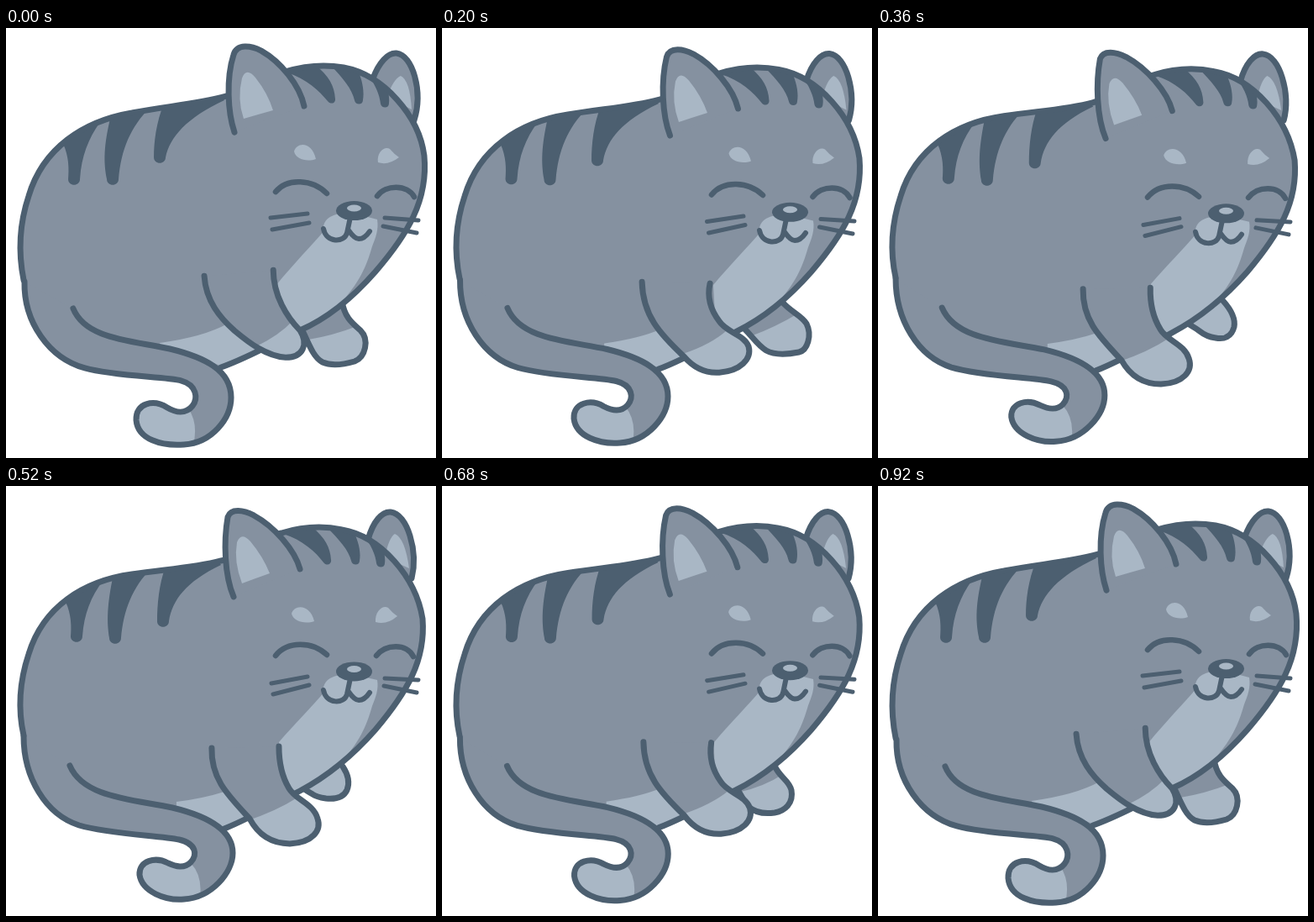
Animation, 512 px wide and 512 px high, one loop 0.96 s. Source, as an HTML page with a canvas:

```html
<!DOCTYPE html>
<html lang="en">
<head>
<meta charset="utf-8">
<title>Kneading cat</title>
<style>
  html, body { margin: 0; width: 100%; height: 100%; overflow: hidden; background: #fff; }
  canvas { display: block; width: 512px; height: 512px; }
</style>
</head>
<body>
<canvas id="stage" width="512" height="512"></canvas>
<script>
const ctx = document.getElementById('stage').getContext('2d');
const LOOP = 960, STEP = 40;
const DARK = '#4c5f70', FUR = '#8591a0', LIGHT = '#a9b7c5';

// Each part lists its raised pose, then its lowered pose.
const parts = {
  body: [
    'M256 404 C290 392 320 374 350 360 C380 347 412 322 440 290 C478 246 503 205 498 152 C492 105 450 56 402 47 C375 42 352 46 332 52 C310 58 285 76 262 81 C225 91 190 93 150 101 C92 111 44 143 27 200 C15 236 15 270 21 300',
    'M260 408 C290 396 325 376 350 363 C380 347 412 322 440 290 C477 246 500 208 496 158 C488 108 446 60 400 52 C372 46 348 50 328 56 C306 62 282 84 256 89 C222 98 190 99 150 105 C92 113 44 144 27 200 C15 236 15 270 21 297'],
  tail: [
    'M22 302 C21 350 51 393 94 405 C130 415 190 415 209 420 C227 425 229 441 222 450 C214 460 202 458 192 452 C176 442 154 446 155 467 C157 490 185 498 212 496 C245 494 268 465 268 440 C268 407 236 392 195 382 C150 372 95 371 80 334',
    'M21 298 C21 347 47 391 87 404 C125 415 185 416 206 421 C227 426 228 439 220 448 C212 456 202 453 193 449 C178 441 158 446 159 463 C162 483 190 494 212 492 C245 490 270 460 270 437 C270 410 240 393 198 383 C150 373 92 371 76 333'],
  tailTip: [
    'M217 453 Q230 472 222 500 L140 510 L140 435 L185 435 L205 458 Z',
    'M220 449 Q236 466 230 496 L140 506 L140 432 L187 432 L206 453 Z'],
  belly: [
    'M183 375 Q235 368 264 352 L300 384 L258 403 Q225 390 183 380 Z',
    'M203 376 Q235 372 260 364 L294 396 L262 408 Q235 394 203 382 Z'],
  chest: [
    'M378 236 C381 222 398 220 412 220 L442 228 C444 240 440 250 436 260 C429 285 420 304 398 328 L350 362 L325 340 L321 307 C343 280 365 258 380 240 Z',
    'M378 240 C381 226 398 224 412 224 L442 231 C444 242 440 252 436 262 C429 287 420 306 398 330 L344 368 L325 340 L325 305 C343 284 365 262 380 244 Z'],
  backStripes: [
    'M68 138 C75 153 75 168 74 180 C74 189 88 189 88 180 C90 152 98 132 112 112 L88 114 Z M125 104 C116 140 116 160 120 180 C120 189 134 189 134 180 C137 145 148 118 172 94 Z M188 90 C179 112 176 135 176 154 C176 163 190 163 190 154 C195 130 215 107 260 86 L255 78 Z',
    'M71 138 C78 153 78 168 77 179 C77 188 91 188 91 179 C93 152 101 132 116 112 L90 114 Z M128 105 C120 142 120 162 123 181 C123 190 137 190 137 181 C140 148 150 121 174 97 Z M190 96 C182 117 180 142 180 161 C180 170 194 170 194 161 C198 136 214 114 256 94 L250 86 Z'],
  headStripes: [
    'M334 53 C358 60 374 76 383 87 C387 92 393 89 392 84 C391 68 384 56 366 42 Z M384 42 C400 58 412 72 415 86 C416 92 425 92 425 86 C427 74 424 60 417 46 Z M430 53 C440 68 445 80 446 90 C447 96 456 96 456 90 C457 82 455 74 452 66 Z',
    'M330 57 C353 64 369 79 378 91 C382 96 388 93 387 88 C386 72 379 60 361 46 Z M379 46 C395 62 408 76 411 89 C412 95 421 95 421 89 C423 77 419 64 412 50 Z M425 57 C435 71 440 82 441 92 C442 98 451 98 451 92 C452 84 450 77 446 69 Z'],
  farEar: [
    'M437 60 C444 41 455 29 465 30 C484 32 497 75 486 110',
    'M431 64 C437 42 448 30 458 31 C478 33 491 78 483 110'],
  farEarIn: [
    'M454 82 Q461 61 470 57 Q481 62 483 97 Z',
    'M451 85 Q456 61 463 57 Q475 62 480 98 Z'],
  ear: [
    'M272 124 C264 100 262 60 271 32 C275 18 292 21 304 27 C327 40 350 68 355 93',
    'M271 132 C260 106 259 66 264 37 C268 26 283 29 295 35 C319 48 344 76 350 99'],
  earIn: [
    'M283 108 Q275 85 281 60 Q286 46 297 59 Q312 78 318 98 Q300 103 283 108 Z',
    'M281 116 Q271 90 275 67 Q280 54 291 66 Q306 84 314 104 Q297 110 281 116 Z'],
  brows: [
    'M343 147 C346 136 364 134 369 156 C358 160 345 156 343 147 Z M443 160 C441 148 451 140 457 144 Q462 150 468 154 Q455 164 443 160 Z',
    'M340 152 C343 141 362 140 367 161 C356 165 342 161 340 152 Z M440 162 C439 149 449 141 455 145 Q460 151 466 155 Q453 166 440 162 Z'],
  eyes: [
    'M321 195 C335 178 365 180 382 197 M442 200 C452 186 478 186 486 201',
    'M321 202 C335 184 365 185 382 201 M441 202 C452 188 477 187 485 203'],
  whiskers: [
    'M315 226 L359 221 M317 240 L361 232 M451 226 L491 229 M449 236 L489 244',
    'M316 235 L359 227 M318 248 L361 237 M451 229 L491 231 M450 238 L489 246'],
  mouth: [
    'M378 239 C381 256 403 256 406 244 L410 225 M408 241 Q415 251 420 251 Q427 251 433 242',
    'M378 243 C381 260 403 260 406 248 L410 229 M408 245 Q415 255 420 255 Q427 255 433 246']
};

// The near arm bends halfway down, so it needs a middle pose.
const arm = [
  'M236 295 C238 325 255 345 272 360 C290 375 310 390 333 392 C354 392 360 376 350 360 C334 344 318 318 318 287',
  'M238 302 C239 342 259 364 288 391 C300 405 315 411 330 410 C355 408 369 394 365 379 C360 365 338 362 330 349 C320 336 315 322 319 304',
  'M245 312 C244 348 263 367 290 396 C300 415 315 426 338 426 C365 425 376 410 371 396 C366 378 345 374 337 360 C328 345 325 330 325 310'];
const armTip = [
  'M298 379 Q325 366 342 348 L380 350 L380 420 L280 420 Z',
  'M286 388 Q320 377 340 359 L390 360 L390 440 L270 440 Z',
  'M286 399 Q322 387 347 371 L400 370 L400 450 L270 450 Z'];

// The far paw circles: forward, up, back and down.
const pawTimes = [0, 200, 360, 520, 680, 760, 920];
const paw = [
  'M400 325 C403 345 413 352 422 360 C433 371 428 392 415 397 C401 401 386 402 377 398 C367 393 362 380 352 358',
  'M405 326 C415 338 428 342 434 352 C441 366 435 384 425 386 C410 389 395 389 386 384 C376 378 370 368 360 358',
  'M411 325 C420 335 426 345 424 356 C421 368 412 371 402 369 C394 368 388 365 383 361 C378 357 374 355 369 352',
  'M401 334 C407 343 410 352 406 362 C402 371 392 373 381 372 C374 371 369 370 365 367 C360 364 356 362 352 358',
  'M396 333 C402 347 413 350 416 362 C419 378 408 387 396 389 C382 391 372 388 365 382 C360 376 356 368 350 358',
  'M398 330 C402 345 415 355 421 366 C427 382 417 394 404 396 C390 398 378 397 370 391 C364 386 360 376 352 358'];
const pawTip = [
  'M360 371 Q390 366 418 355 L450 360 L440 420 L350 420 Z',
  'M370 366 Q395 357 424 340 L450 340 L450 410 L360 410 Z',
  'M365 350 Q388 342 410 326 L440 320 L440 390 L360 390 Z',
  'M350 358 Q376 348 398 330 L430 330 L430 390 L350 390 Z',
  'M352 365 Q382 359 408 342 L440 345 L440 410 L345 410 Z',
  'M358 371 Q388 365 414 350 L440 355 L440 415 L350 415 Z'];
const cycle = list => [...list, list[0]];
const pawPoses = cycle(paw), pawTips = cycle(pawTip);

const NUM = /-?\d+(\.\d+)?/g;
const nums = s => s.match(NUM).map(Number);

function blend(poses, fn) {
  const sets = poses.map(nums);
  let i = 0;
  return new Path2D(poses[0].replace(NUM, () => {
    const v = fn(sets.map(s => s[i]));
    i++;
    return v.toFixed(2);
  }));
}

const mix = ([a, b], u) => blend([a, b], ([p, q]) => p + (q - p) * u);
const mix3 = ([a, m, b], u) => u < .5 ? mix([a, m], u * 2) : mix([m, b], u * 2 - 1);

// Smooth cyclic curve through the timed poses.
function along(times, poses, t) {
  const n = times.length;
  const at = k => times[(k + n) % n] + LOOP * Math.floor(k / n);
  let k = n - 1;
  while (times[k] > t) k--;
  const idx = [k - 1, k, k + 1, k + 2];
  const [t0, t1, t2, t3] = idx.map(at);
  const d = t2 - t1, s = (t - t1) / d;
  return blend(idx.map(j => poses[(j + n) % n]), ([a, b, c, e]) => {
    const m = (c - a) / (t2 - t0) * d, w = (e - b) / (t3 - t1) * d;
    return b + s * (m + s * (3 * (c - b) - 2 * m - w + s * (2 * (b - c) + m + w)));
  });
}

function fill(path, color) {
  ctx.fillStyle = color;
  ctx.fill(path);
}

function line(path, width = 7) {
  ctx.lineWidth = width;
  ctx.stroke(path);
}

function within(shape, draw) {
  ctx.save();
  ctx.clip(shape);
  draw();
  ctx.restore();
}

function limb(shape, tip) {
  fill(shape, FUR);
  within(shape, () => fill(tip, LIGHT));
  line(shape);
}

function oval(x, y, rx, ry, color) {
  const p = new Path2D();
  p.ellipse(x, y, rx, ry, 0, 0, Math.PI * 2);
  fill(p, color);
}

function draw(t) {
  const wave = (1 - Math.cos((t + 20) / LOOP * Math.PI * 2)) / 2;
  const u = 1.03 * wave ** .85;
  const p = {};
  for (const name in parts) p[name] = mix(parts[name], u);

  ctx.clearRect(0, 0, 512, 512);
  ctx.strokeStyle = DARK;
  ctx.lineCap = ctx.lineJoin = 'round';

  limb(along(pawTimes, pawPoses, t), along(pawTimes, pawTips, t));
  limb(p.farEar, p.farEarIn);

  // The fill reaches under the tail, where the outline stays open.
  const torso = new Path2D(p.body);
  torso.lineTo(50, 360);
  torso.lineTo(150, 395);
  torso.closePath();
  fill(torso, FUR);
  within(torso, () => {
    fill(p.belly, LIGHT);
    fill(p.chest, LIGHT);
    fill(p.backStripes, DARK);
    fill(p.headStripes, DARK);
  });
  line(p.body);

  limb(mix3(arm, u), mix3(armTip, u));

  fill(p.ear, FUR);
  fill(p.earIn, LIGHT);
  line(p.ear);

  fill(p.brows, LIGHT);
  line(p.eyes, 6.5);
  line(p.whiskers, 5);
  line(p.mouth, 6);
  oval(414.5, 217.5 + 3.5 * u, 21.5, 11.5, DARK);
  oval(414.5, 214.5 + 3.5 * u, 8.5, 4, LIGHT);

  limb(p.tail, p.tailTip);
}

const start = performance.now();
function tick() {
  const t = (performance.now() - start) % LOOP;
  draw(Math.floor(t / STEP) * STEP);
  requestAnimationFrame(tick);
}
tick();
</script>
</body>
</html>
```
